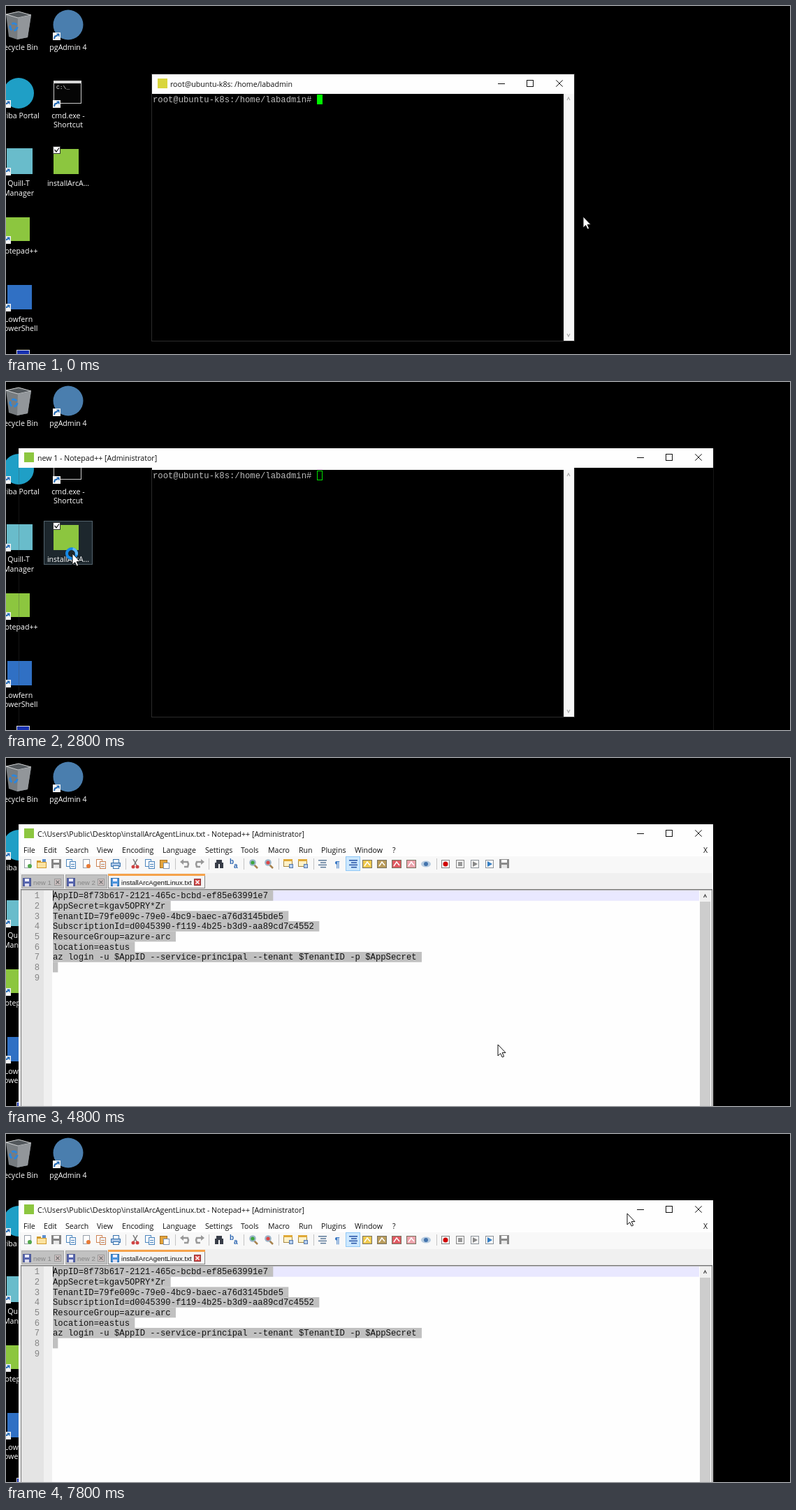
Animation of 1122x499 px, one loop 8000 ms. Source, as an HTML page with a canvas:

```html
<!DOCTYPE html>
<html lang="en">
<head>
<meta charset="utf-8">
<title>Desktop session</title>
<style>
html, body { margin: 0; width: 100%; height: 100%; overflow: hidden; background: #000; }
canvas { display: block; }
</style>
</head>
<body>
<canvas id="stage" width="1122" height="499"></canvas>
<script>
const ctx = document.getElementById('stage').getContext('2d');
const LOOP = 8000, STEP = 200;
const UI = '10.6px "Open Sans", sans-serif';
const MONO = '12.22px "Liberation Mono", monospace';
const TAB = '9.7px "Liberation Sans", sans-serif';
const CHAR = 7.333, LINE = 14.67;

const lines = [
  'AppID=8f73b617-2121-465c-bcbd-ef85e63991e7',
  'AppSecret=kgav5OPRY*Zr',
  'TenantID=79fe009c-79e0-4bc9-baec-a76d3145bde5',
  'SubscriptionId=d0045390-f119-4b25-b3d9-aa89cd7c4552',
  'ResourceGroup=azure-arc',
  'location=eastus',
  'az login -u $AppID --service-principal --tenant $TenantID -p $AppSecret',
  '', ''
];

// Pointer keys: time, x, y
const path = [
  [0, 826, 302], [1000, 98, 248], [1400, 95, 246], [3600, 95, 246],
  [4400, 314, 285], [4800, 704, 411], [5400, 172, 246], [5600, 172, 246],
  [6000, 200, 268], [6600, 214, 279], [6800, 214, 279], [7800, 889, 114]
];

function pointer(t) {
  let i = 1;
  while (i < path.length - 1 && path[i][0] < t) i++;
  const [t0, x0, y0] = path[i - 1], [t1, x1, y1] = path[i];
  const k = Math.min(1, (t - t0) / (t1 - t0)), e = k * k * (3 - 2 * k);
  return [x0 + (x1 - x0) * e, y0 + (y1 - y0) * e];
}

function rect(color, x, y, w, h) {
  ctx.fillStyle = color;
  ctx.fillRect(x, y, w, h);
}
function frame(color, x, y, w, h) {
  ctx.strokeStyle = color;
  ctx.lineWidth = 1;
  ctx.strokeRect(x + .5, y + .5, w - 1, h - 1);
}
function box(edge, fill, x, y, w, h) {
  rect(fill, x, y, w, h);
  frame(edge, x, y, w, h);
}
function disc(color, x, y, r) {
  ctx.fillStyle = color;
  ctx.beginPath();
  ctx.arc(x, y, r, 0, 7);
  ctx.fill();
}
function poly(points, fill, stroke, width = 1) {
  ctx.beginPath();
  points.forEach(([x, y]) => ctx.lineTo(x, y));
  if (fill) {
    ctx.closePath();
    ctx.fillStyle = fill;
    ctx.fill();
  }
  if (stroke) {
    ctx.strokeStyle = stroke;
    ctx.lineWidth = width;
    ctx.stroke();
  }
}
function text(s, x, y, color, font = UI, align = 'left') {
  ctx.font = font;
  ctx.fillStyle = color;
  ctx.textAlign = align;
  ctx.fillText(s, x, y);
}
function cross(x, y, r, color, width = 1) {
  poly([[x - r, y - r], [x + r, y + r]], null, color, width);
  poly([[x - r, y + r], [x + r, y - r]], null, color, width);
}
function chevron(x, y, dx, dy, color) {
  poly([[x - dx - dy, y - dy - dx], [x + dx, y + dy], [x - dx + dy, y - dy + dx]], null, color, 1.2);
}
function windowButtons(x, y, color) {
  rect(color, x, y, 10, 1);
  frame(color, x + 41, y - 5, 10, 10);
  cross(x + 88, y, 4.7, color);
}

function label(x, y, ...rows) {
  rows.forEach((s, i) => text(s, x, y + i * 13.8, '#fff', UI, 'center'));
}
function shortcut(x, y) {
  rect('#f4f4f4', x, y, 11, 11);
  poly([[x + 2, y + 9], [x + 3, y + 5.5], [x + 7, y + 4]], null, '#1b66b5', 2);
  poly([[x + 5, y + 1.5], [x + 9.5, y + 1.5], [x + 9.5, y + 6.5]], '#1b66b5');
}

function recycleBin() {
  poly([[0, 12], [18, 8], [36, 13], [31, 45], [16, 48], [4, 44]], '#777c80');
  poly([[0, 12], [18, 8], [36, 13], [17, 17]], '#53585c', '#d0d2d3');
  poly([[17, 17], [36, 13], [31, 45], [16, 48]], '#92969a');
  ctx.strokeStyle = '#2b86dc';
  ctx.lineWidth = 3;
  for (let i = 0; i < 3; i++) {
    ctx.beginPath();
    ctx.arc(11, 30, 5, i * 2.09, i * 2.09 + 1.5);
    ctx.stroke();
  }
}

function desktop(t) {
  rect('#000', 0, 0, 1122, 499);
  recycleBin();
  label(18, 63, 'Recycle Bin');
  disc('#1f9fc6', 18, 125, 22);
  shortcut(-4, 135);
  label(18, 160.5, 'Oriba Portal');
  rect('#69bccb', 1, 204, 37, 37);
  shortcut(-4, 232);
  label(18, 258, 'Quill-T', 'Manager');
  rect('#8cc63f', 0, 303, 34, 34);
  shortcut(-4, 330);
  label(18, 355, 'Notepad++');
  rect('#3070c4', 2, 400, 35, 35);
  shortcut(-4, 427);
  label(18, 452.5, 'Lowfern', 'PowerShell');
  box('#ddd', '#1730b0', 15, 493, 19, 12);

  disc('#4a7eae', 89, 27, 21.5);
  shortcut(67, 38);
  label(89, 63, 'pgAdmin 4');
  box('#c9c9c9', '#050505', 68, 107, 40, 33);
  rect('#d6d6d6', 68, 107, 40, 4);
  text('C:\\_', 72, 119, '#eee', '8px "Liberation Mono", monospace');
  shortcut(67, 135);
  label(89, 160.5, 'cmd.exe -', 'Shortcut');

  if (t >= 1400) box('#53636d', '#1d272d', 54, 199, 70, 63);
  else if (t >= 1000) box('#30383d', '#151a1d', 54, 199, 70, 63);
  rect('#8cc63f', 68, 205, 36, 36);
  box('#333', '#fff', 67, 201, 11, 11);
  poly([[69.5, 206], [72, 209], [76, 203.5]], null, '#111', 1.2);
  label(89, 258, 'installArcA...');
}

function terminal(active) {
  const ink = active ? '#111' : '#999';
  box('#2b2b2b', '#000', 208, 97, 606, 384);
  rect('#fefefe', 209, 98, 604, 28);
  rect('#d9d63c', 217, 104, 14, 14);
  text('root@ubuntu-k8s: /home/labadmin', 235, 115.5, ink);
  windowButtons(704, 111, ink);
  rect('#f7f7f7', 798, 126, 15, 354);
  chevron(805, 133, 0, -2, '#aaa');
  chevron(805, 472, 0, 2, '#aaa');
  text('root@ubuntu-k8s:/home/labadmin#', 210, 137.5, '#bcbcbc', MONO);
  if (active) rect('#00f400', 445, 127, 8, 14);
  else frame('#00e000', 445, 127, 8, 14);
}

function editorTitle(s) {
  rect('#fefefe', 18, 95, 994, 28);
  rect('#8cc63f', 26, 101, 14, 14);
  text(s + ' - Notepad++ [Administrator]', 45, 112.5, '#111');
  windowButtons(903, 108, '#111');
}

const icon = {
  page(x, c) {
    box('#98a0aa', '#fff', x - 5, 145, 10, 13);
    disc(c, x + 3, 155, 3);
  },
  pages(x, c) {
    box(c, '#fff', x - 7, 145, 9, 11);
    box(c, '#eef3fa', x - 2, 148, 9, 11);
    rect(c, x, 152, 5, 1);
    rect(c, x, 155, 5, 1);
  },
  folder(x, c) {
    rect(c, x - 7, 147, 6, 3);
    box(c, '#fbe3a0', x - 7, 149, 14, 9);
    rect('#5d8fd0', x + 1, 145, 5, 4);
  },
  disk(x, c) {
    box(c, c, x - 7, 145, 14, 13);
    rect('#fff', x - 4, 146, 8, 4);
    rect('#e8e8e8', x - 4, 153, 8, 5);
  },
  printer(x, c) {
    box(c, '#fff', x - 4, 145, 9, 6);
    box(c, '#aac6e8', x - 7, 150, 14, 6);
    box(c, '#fff', x - 4, 154, 9, 5);
  },
  scissors(x, c) {
    poly([[x - 3, 145], [x + 2, 154]], null, '#777', 1.5);
    poly([[x + 3, 145], [x - 2, 154]], null, '#777', 1.5);
    disc(c, x - 3, 156, 2.5);
    disc(c, x + 3, 156, 2.5);
  },
  paste(x, c) {
    box('#a87322', c, x - 7, 146, 11, 12);
    box('#7c93b4', '#fff', x - 2, 150, 9, 9);
  },
  undo(x, c, d = -1) {
    poly([[x + 4 * d, 149], [x - 4 * d, 149], [x - 5 * d, 152], [x - 4 * d, 156], [x + d, 156]], null, c, 2.5);
    poly([[x + 7 * d, 149], [x + 2 * d, 145], [x + 2 * d, 153]], c);
  },
  redo(x, c) { icon.undo(x, c, 1); },
  find(x, c) {
    rect(c, x - 6, 150, 5, 8);
    rect(c, x + 1, 150, 5, 8);
    rect(c, x - 4, 146, 8, 6);
  },
  swap(x, c) {
    text('b', x - 6, 152, c, 'bold 10px "Liberation Sans", sans-serif');
    text('a', x, 158, c, 'bold 10px "Liberation Sans", sans-serif');
  },
  zoom(x, c) {
    poly([[x, 152], [x + 6, 158]], null, '#a8834e', 2.5);
    disc('#9bb5c9', x - 1, 150, 4.8);
    disc(c, x - 1, 150, 2.6);
  },
  sync(x, c) {
    box('#a78840', '#fff2c8', x - 7, 145, 13, 11);
    rect(c, x - 7, 145, 13, 3);
    box('#5577a8', '#b7d0f0', x + 1, 152, 6, 6);
  },
  rows(x, c) {
    for (let i = 0; i < 4; i++) rect(c, x - 6 + i % 2 * 3, 146 + i * 3.3, 12 - i % 2 * 4, 1.5);
  },
  mark(x, c) { text('¶', x, 157, c, 'bold 13px "Liberation Sans", sans-serif', 'center'); },
  panel(x, c) {
    box('#77715f', c, x - 7, 146, 14, 12);
    poly([[x - 4, 155], [x, 149], [x + 4, 154]], null, '#fff', 1.5);
  },
  eye(x, c) {
    ctx.beginPath();
    ctx.ellipse(x, 152, 7, 4.5, 0, 0, 7);
    ctx.fillStyle = '#b6cbe0';
    ctx.fill();
    disc(c, x, 152, 3);
  },
  button(x, c) {
    box('#858585', '#f5f5f5', x - 6, 146, 12, 12);
    if (c === '#d00000') disc(c, x, 152, 3.5);
    else rect(c, x - 3, 149, 6, 6);
  },
  play(x, c) {
    box('#8b9299', '#f5f5f5', x - 6, 146, 12, 12);
    poly([[x - 3, 148], [x + 4, 152], [x - 3, 156]], c);
  }
};

const tools = [
  ['page', 31, '#52a84c'], ['folder', 51, '#d19a2b'], ['disk', 72, '#858585'],
  ['pages', 93, '#4d86bd'], ['page', 115, '#e87b36'], ['pages', 136, '#cc8355'],
  ['printer', 157, '#3872ad'], ['scissors', 185], ['pages', 206],
  ['paste', 227, '#e3a33c'], ['undo', 256, '#989898'], ['redo', 277, '#989898'],
  ['find', 305, '#383d48'], ['swap', 326, '#2d66b1'], ['zoom', 354, '#3ca53c'],
  ['zoom', 376, '#dc4646'], ['sync', 404, '#e0a937'], ['sync', 425, '#e0a937'],
  ['rows', 453, '#5b7898'], ['mark', 474, '#3b79c5'], ['rows', 497, '#2451a4'],
  ['panel', 517, '#efc94e'], ['panel', 538, '#b99c5c'], ['panel', 559, '#df5962'],
  ['panel', 580, '#eda4ad'], ['eye', 601, '#4373ac'], ['button', 629, '#d00000'],
  ['button', 650, '#999'], ['play', 671, '#888'], ['play', 692, '#347ec4'], ['disk', 713, '#8b8b8b']
];

function toolbar(selected) {
  rect('#f8f8f8', 19, 141, 992, 24);
  for (const x of [171, 242, 290, 340, 390, 440, 616]) rect('#c4c4c4', x, 144, 1, 16);
  box('#90c8f6', '#cce8ff', 486, 141, 21, 21);
  for (const [kind, x, color] of tools) {
    const edit = kind === 'scissors' ? '#cf4343' : '#4d86bd';
    icon[kind](x, color || (selected ? edit : '#8c8c8c'));
  }
}

function tab(x, w, name, active) {
  const pad = active ? 4 : 2, cx = x + w - 7 - pad;
  box(active ? '#888' : '#aaa', active ? '#f4f4f4' : '#c1c1c1', x, 167, w, 20);
  if (active) rect('#f5a24b', x, 166, w, 3);
  box(active ? '#286cad' : '#4b5793', active ? '#4d95dc' : '#5665ae', x + pad, 172, 12, 12);
  rect('#eef', x + pad + 3, 173, 6, 4);
  rect('#dde', x + pad + 3, 180, 6, 4);
  text(name, x + pad + 15, 181.5, active ? '#111' : '#858585', TAB);
  box(active ? '#8d3434' : '#999', active ? '#d84b4b' : '#d3c5c5', cx - 5, 173, 10, 10);
  cross(cx, 178, 2.5, active ? '#fff' : '#777', 1.5);
}

function editor(t) {
  const selected = t >= 4600;
  rect('#fefefe', 18, 95, 994, 404);
  editorTitle('C:\\Users\\Public\\Desktop\\installArcAgentLinux.txt');
  const menus = [['File', 25], ['Edit', 54], ['Search', 85], ['View', 130], ['Encoding', 166], ['Language', 224],
    ['Settings', 285], ['Tools', 336], ['Macro', 375], ['Run', 419], ['Plugins', 451], ['Window', 499], ['?', 553], ['X', 998]];
  for (const [s, x] of menus) text(s, x, 135.5, '#111');
  toolbar(selected);

  rect('#f0f0f0', 19, 165, 992, 24);
  tab(22, 61, 'new 1');
  tab(85, 60, 'new 2');
  tab(146, 139, 'installArcAgentLinux.txt', true);

  rect('#fefefe', 21, 188, 990, 311);
  rect('#777', 21, 188, 989, 1.5);
  rect('#777', 21, 188, 1, 311);
  rect('#e4e4e4', 22, 190, 32, 309);
  rect('#f0f0f0', 54, 190, 12, 309);
  const caretY = 190 + (selected ? 0 : 8 * LINE);
  rect('#e9e8ff', 67, caretY, 925, LINE);
  lines.forEach((s, i) => {
    const y = 190 + i * LINE;
    if (selected && i < 8) rect('#c0c0c0', 67, y, (s.length + 1) * CHAR, LINE);
    text(i + 1, 48, y + 11.3, '#858585', MONO, 'right');
    text(s, 67, y + 11.3, '#111', MONO);
  });
  if (selected || (t - 3000) % 1060 < 530) rect('#111', 67, caretY, 1, LINE);

  rect('#f0f0f0', 993, 190, 15, 309);
  rect('#cdcdcd', 993, 206, 15, 293);
  chevron(1000.5, 198, 0, -2, '#444');
  rect('#f0f0f0', 1008, 190, 3, 309);
  rect('#777', 1010, 188, 1, 311);
}

function contextMenu(t) {
  box('#b5b5b5', '#f1f1f3', 172, 246, 223, 260);
  if (t >= 5800) rect('#91c9f7', 175, t < 6200 ? 248.5 : 269, 217, 20);
  const items = [['Cut', 258], ['Copy', 279], ['Paste', 299], ['Delete', 319], ['Select All', 339], ['Begin/End Select', 359],
    ['Style token', 386], ['Remove style', 406], ['Plugin commands', 433], ['UPPERCASE', 459.5], ['lowercase', 480]];
  for (const [s, y] of items) {
    text(s, 204, y + 4, '#111');
    if (/style|Style|Plugin/.test(s)) chevron(382, y, 1.6, 0, '#333');
  }
  for (const y of [373, 419, 446, 493]) rect('#d3d3d3', 202, y, 190, 1);
}

function drawPointer(t) {
  const [x, y] = pointer(t);
  if (t >= 2200 && t < 3000) {
    ctx.strokeStyle = '#1689e6';
    ctx.lineWidth = 4;
    ctx.beginPath();
    ctx.arc(94, 246, 7, 0, 7);
    ctx.stroke();
    ctx.strokeStyle = '#62b8f7';
    ctx.beginPath();
    ctx.arc(94, 246, 7, t / 160, t / 160 + 1.6);
    ctx.stroke();
  }
  if (t >= 3800 && t < 4600) {
    rect('#666', x + 16, y - 2, 1, 13);
    rect('#666', x + 14, y - 3, 5, 1);
    rect('#666', x + 14, y + 11, 5, 1);
  }
  const shape = [[0, 0], [0, 16], [3.7, 12.6], [6.2, 18], [8.6, 17], [6.2, 11.6], [11, 11.6], [0, 0]];
  poly(shape.map(([a, b]) => [x + a, y + b]), '#fff', '#111');
}

function draw(t) {
  desktop(t);
  if (t < 3000) terminal(t < 1400);
  if (t >= 3000) editor(t);
  else if (t >= 2800) {
    editorTitle('new 1');
    const edge = 'rgba(70, 70, 70, .3)';
    rect(edge, 18, 123, 1, 376);
    rect(edge, 1012, 95, 1, 404);
  }
  if (t >= 5600 && t < 7000) contextMenu(t);
  drawPointer(t);
}

const start = performance.now();
function tick() {
  const t = (performance.now() - start) % LOOP;
  draw(Math.floor(t / STEP) * STEP);
  requestAnimationFrame(tick);
}
tick();
</script>
</body>
</html>
```
